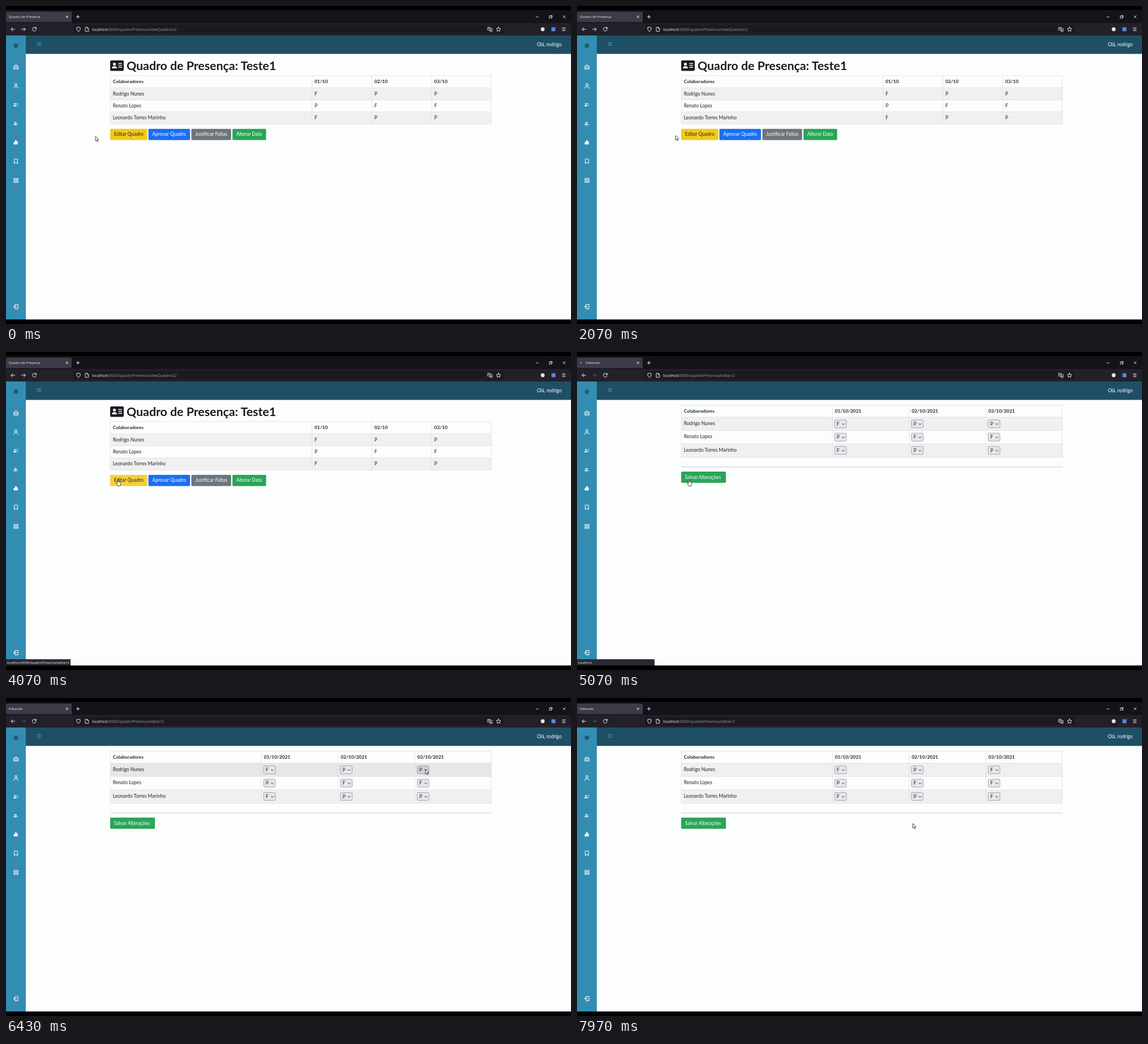
Animation of 998x561 px, one loop 8 s. Source, as an HTML page:

```html
<!DOCTYPE html>
<html lang="pt-BR">
<head>
<meta charset="utf-8">
<title>Quadro de Presença</title>
<style>
html, body { margin: 0; width: 100%; height: 100%; overflow: hidden; background: #000; }
svg { display: block; width: 998px; height: 561px; }
text { font: 8.5px Lato, "Open Sans", sans-serif; fill: #212529; white-space: pre; }
.b { font-size: 8.4px; font-weight: 700; }
.h { font-size: 21.3px; font-weight: 700; fill: #1b1c22; }
.ui { font: 5.85px "Open Sans", "Noto Sans", sans-serif; fill: #f2f2f6; }
.url { font-size: 6.75px; fill: #9897a1; }
.w { fill: #fff; }
.line { fill: none; stroke: #f1f1f5; stroke-width: 1; stroke-linecap: round; stroke-linejoin: round; }
.side { stroke: #eaf6fa; stroke-width: 1.1; }
.fill { fill: #eaf6fa; }
.rule { fill: none; stroke: #dcdfe4; stroke-width: .8; }
</style>
</head>
<body>
<svg viewBox="0 0 998 561" xmlns="http://www.w3.org/2000/svg">
  <rect width="998" height="561"/>
  <rect y="7" width="998" height="23" fill="#14131a"/>
  <rect y="30" width="998" height="22" fill="#22212a"/>
  <rect y="10" width="116" height="18.5" rx="1.5" fill="#3d3b47"/>
  <rect x="120" y="33.5" width="759" height="15" rx="2" fill="#1b1a21"/>
  <circle id="dot" cx="7" cy="19" r="1" fill="#cfcfd8"/>
  <text id="tab" class="ui" x="5" y="21.2"></text>
  <g class="line">
    <path d="M106 17.3l3.4 3.4m0-3.4l-3.4 3.4M124.3 19h5.4M127 16.3v5.4"/>
    <path d="M936 19.3h4.4M960 18h3.6v3.5h-3.6zM961.3 18v-1.3h3.5v3.4h-1.2M984 17l4 4m0-4l-4 4" stroke-width=".8"/>
    <path d="M15.5 41h-6.5m2.8-2.8L9 41l2.8 2.8"/>
    <path id="fwd" d="M27.7 41h6.5m-2.8-2.8l2.8 2.8l-2.8 2.8"/>
    <path d="M53 39.2a3.4 3.4 0 1 0 .3 2.6M53.4 37.5v2.3h-2.3"/>
    <path d="M128 37.3l3.2 1.1c.1 3.5-.8 5.3-3.2 6.7c-2.4-1.4-3.3-3.2-3.2-6.7z"/>
    <path d="M140.4 37.5h3.4l2 2v5.2h-5.4zM143.5 37.6v2.2h2.2" stroke-width=".9"/>
    <path d="M851 37.5h4.4v5h-4.4zM856 39.5h2.8v5.5h-4.2v-1.7M852 39.4h2.4M853.2 38.6c.1 1.5-.4 2.3-1.3 2.8M856 43.6l.8-2l.8 2" stroke-width=".7"/>
    <path d="M870 37l1.2 2.6l2.8.3l-2.1 1.9l.6 2.8l-2.5-1.4l-2.5 1.4l.6-2.8l-2.1-1.9l2.8-.3z" stroke-width=".9"/>
    <path d="M982.6 38.5h5.2M982.6 41h5.2M982.6 43.5h5.2" stroke-width=".9"/>
  </g>
  <circle cx="948" cy="41" r="3.4" fill="#e5e5ea"/>
  <rect x="963.5" y="37.5" width="7" height="7" fill="#5587dc"/>
  <text class="ui url" x="152" y="43.6"><tspan fill="#eeeef2">localhost</tspan><tspan id="path"></tspan></text>

  <rect y="52" width="998" height="501" fill="#fcfdfd"/>
  <rect x="35" y="52" width="963" height="32.5" fill="#1e4f64"/>
  <rect y="52" width="35" height="501" fill="#338db2"/>
  <path d="M54.5 64.5h7.5M54.5 67h7.5M54.5 69.5h7.5" stroke="#3796b9" stroke-width="1.1"/>
  <text class="w" x="981.5" y="71" text-anchor="end">Olá, rodrigo</text>
  <circle cx="17.5" cy="70" r="4" fill="#205d74"/>
  <g class="line side">
    <path d="M13.7 106.3h2.4v5h-2.4zM16.1 104.3h3v7h-3zM19.1 106.3h2.4v5h-2.4z"/>
    <circle cx="17.5" cy="138.8" r="2"/>
    <path d="M13.9 145.2c0-4 7.2-4 7.2 0"/>
    <path d="M14.6 270h5.8v7.7l-2.9-1.8l-2.9 1.8z"/>
    <path d="M14 304h2.7v2.7H14zM18.6 304h2.7v2.7h-2.7zM14 308.6h2.7v2.7H14zM18.6 308.6h2.7v2.7h-2.7z"/>
    <path d="M16 528.5v-2h5.3v7.6H16v-2M19 530.3h-5.2m1.7-1.8l-1.8 1.8l1.8 1.8"/>
  </g>
  <g class="fill">
    <circle cx="15.7" cy="172.6" r="1.5"/><path d="M13 177c0-3.2 5.4-3.2 5.4 0zM18.3 171.6h2.6v1h-2.6zM18.8 173.6h2.1v1h-2.1zM19.4 175.6h1.5v1h-1.5z"/>
    <circle cx="16" cy="206" r="1.5"/><path d="M13.3 210.3c0-3.2 5.4-3.2 5.4 0zM18 205a1.4 1.4 0 0 1 .8 2.4c1.2.4 1.8 1.3 1.8 2.9h-1.2c0-1.4-.4-2.1-1.3-2.8z"/>
    <path d="M13.5 240h2.2v-2.3l2-1.4l1.3 1.4v1.3h1.8v5.2h-7.3z"/>
  </g>

  <g id="view"></g>
  <g id="edit"></g>
  <g id="status"><rect id="bar" y="542" height="11" fill="#2b2a33"/><text id="link" class="ui" x="2" y="550"></text></g>
  <g id="cursor" stroke="#18181c" stroke-width=".8" stroke-linejoin="round" fill="#fff">
    <path id="arrow" d="M0 0v8l1.9-1.7l1.4 3l1.3-.6l-1.4-2.9l2.6-.2z"/>
    <path id="hand" d="M-1 .8c0-1.2 1.8-1.2 1.8 0v3.1l3.1.8c.8.2 1.1.7 1 1.5l-.6 3.4l-.7 1.8h-4L-2.9 7.2c-.6-1 .5-1.7 1.2-1l.7.8z"/>
  </g>
</svg>
<script>
const $ = id => document.getElementById(id);
const people = ['Rodrigo Nunes', 'Renato Lopes', 'Leonardo Torres Marinho'];
const marks = ['FPP', 'PFF', 'FPP'];
const HOVER = '#e7e7e8', STRIPE = '#f0f0f1', PLAIN = '#fcfdfd';
const stripe = r => r % 2 ? PLAIN : STRIPE;

const text = (x, y, s, cls = '', id = '') => `<text x="${x}" y="${y}" class="${cls}" id="${id}">${s}</text>`;
const rect = (x, y, w, h, fill, more = '') => `<rect x="${x}" y="${y}" width="${w}" height="${h}" fill="${fill}" ${more}/>`;
const button = (x, y, w, fill, label, cls = 'w', id = '') =>
  rect(x, y, w, 19.7, fill, `rx="1.8" id="${id}"`) + text(x + 6.7, y + 12.6, label, cls);

// ys: row edges, xs: inner column edges
function table(ys, xs, heads, prefix) {
  const last = ys.length - 1;
  let s = '';
  people.forEach((p, r) => {
    s += rect(184, ys[r + 1], 673.5, ys[r + 2] - ys[r + 1], stripe(r), `id="${prefix}${r}"`);
  });
  s += `<path class="rule" d="${ys.map(y => `M184 ${y}h673.5`).join('')}${
    [184.4, ...xs, 857.2].map(x => `M${x} ${ys[0]}V${ys[last]}`).join('')}"/>`;
  heads.forEach((h, i) => s += text(i ? xs[i - 1] + 4.5 : 188.7, ys[0] + 13.5, h, 'b'));
  people.forEach((p, r) => s += text(188.7, ys[r + 1] + 13.5, p));
  return s;
}

function buildView() {
  const ys = [122.8, 144.2, 165.5, 186.8, 208.2], xs = [540.5, 646.2, 752];
  let s = rect(184, 96, 24, 18.5, '#1b1c22', 'rx="2.2"') +
    '<g fill="#fff"><circle cx="191.5" cy="102.5" r="2.5"/><path d="M187 110c0-5.2 9-5.2 9 0z"/>' +
    '<path d="M198.5 100.8h6.3v1.4h-6.3zM198.5 104.2h6.3v1.4h-6.3zM198.5 107.6h6.3v1.4h-6.3z"/></g>' +
    text(213, 112.8, 'Quadro de Presença: Teste1', 'h') +
    table(ys, xs, ['Colaboradores', '01/10', '02/10', '03/10'], 'v');
  marks.forEach((row, r) => [...row].forEach((m, c) => s += text(xs[c] + 4.5, ys[r + 1] + 13.5, m)));
  return s +
    button(184, 216.8, 65.5, '#f1c91b', 'Editar Quadro', '', 'editBtn') +
    button(251.5, 216.8, 73.5, '#1b6ef1', 'Aprovar Quadro') +
    button(327.4, 216.8, 70.2, '#6c757b', 'Justificar Faltas') +
    button(400, 216.8, 59.5, '#29a558', 'Alterar Data');
}

function buildEdit() {
  const ys = [93.8, 115, 138.5, 162, 185.5], xs = [451, 586.7, 722.2];
  let s = table(ys, xs, ['Colaboradores', '01/10/2021', '02/10/2021', '03/10/2021'], 'e');
  marks.forEach((row, r) => [...row].forEach((m, c) => {
    const x = xs[c] + 4.2, y = ys[r + 1] + 4.7;
    s += rect(x, y, 20.6, 14, '#e7e7eb', `rx="2" stroke="#8d8d9b" stroke-width=".8" id="s${r}${c}"`) +
      text(x + 3.6, y + 9.9, m, '', `m${r}${c}`) +
      `<path d="M${x + 13} ${y + 6.4}l2.1 2.1l2.1-2.1" fill="none" stroke="#25252b" stroke-width="1"/>`;
  }));
  return s + '<path d="M184 202.9h673.5" stroke="#c6c8d2" stroke-width=".9"/>' +
    button(184, 211, 79, '#29a558', 'Salvar Alterações');
}

$('view').innerHTML = buildView();
$('edit').innerHTML = buildEdit();

const LOOP = 8000, SWITCH = 5000;
// time, x, y of the pointer tip
const route = [
  [0, 158, 230], [1400, 158, 230], [1700, 174, 228.5], [3000, 174, 228.5], [3280, 198, 225],
  [5180, 198, 225], [5770, 707, 135.5], [5980, 741, 126], [6640, 741, 126],
  [6900, 741.5, 172.5], [7470, 741.5, 172.5], [7940, 593, 221.5], [LOOP, 593, 221.5]
];

function pointer(t) {
  let i = 1;
  while (i < route.length - 1 && t >= route[i][0]) i++;
  const [t0, x0, y0] = route[i - 1], [t1, x1, y1] = route[i];
  const k = Math.min(1, Math.max(0, (t - t0) / (t1 - t0))), e = k * k * (3 - 2 * k);
  return [x0 + (x1 - x0) * e, y0 + (y1 - y0) * e];
}

const show = (id, on) => $(id).style.display = on ? '' : 'none';
const put = (id, s) => { if ($(id).textContent !== s) $(id).textContent = s; };
const ramp = (t, a, b) => Math.min(1, Math.max(0, (t - a) / (b - a)));
const inside = (x, y, l, t, r, b) => x > l && x < r && y > t && y < b;

function draw(t) {
  const editing = t >= SWITCH, loading = editing && t < 5300;
  const [x, y] = pointer(t);
  const [hx, hy] = pointer(Math.max(0, t - 50)); // hover trails the pointer a little

  show('view', !editing);
  show('edit', editing);
  show('dot', loading);
  put('tab', editing ? 'Editando' : 'Quadro de Presença');
  $('tab').setAttribute('x', loading ? 16 : 5);
  put('path', ':8000/quadroPresenca/' + (editing ? 'editar/2' : 'viewQuadros/2'));
  $('fwd').style.stroke = editing ? '#5d5c66' : '#f1f1f5';

  const overEdit = !editing && inside(x, y, 184, 217, 249.5, 236.5);
  const overSave = editing && inside(x, y, 184, 211, 263, 231);
  $('editBtn').setAttribute('fill', overEdit ? '#f5cf36' : '#f1c91b');

  show('status', overEdit || loading);
  $('status').style.opacity = editing ? 1 : ramp(t, 3240, 3420);
  $('bar').setAttribute('width', editing ? 137 : 114);
  put('link', editing ? 'localhost' : 'localhost:8000/quadroPresenca/editar/2');

  const rowAt = editing && inside(hx, hy, 184, 115, 857, 185.5) ? Math.floor((hy - 115) / 23.5) : -1;
  people.forEach((p, r) => {
    $('e' + r).setAttribute('fill', r === rowAt ? HOVER : stripe(r));
    const over = r === rowAt && inside(hx, hy, 726, 119 + r * 23.5, 747, 134.5 + r * 23.5);
    $(`s${r}2`).setAttribute('fill', over ? '#cfcfd5' : '#e7e7eb');
  });
  put('m02', t >= 6450 ? 'F' : 'P');
  put('m22', t >= 7400 ? 'F' : 'P');

  show('hand', overEdit || overSave);
  show('arrow', !(overEdit || overSave));
  $('cursor').setAttribute('transform', `translate(${x.toFixed(2)} ${y.toFixed(2)})`);
}

function tick() {
  draw(performance.now() % LOOP);
  requestAnimationFrame(tick);
}
tick();
</script>
</body>
</html>
```
